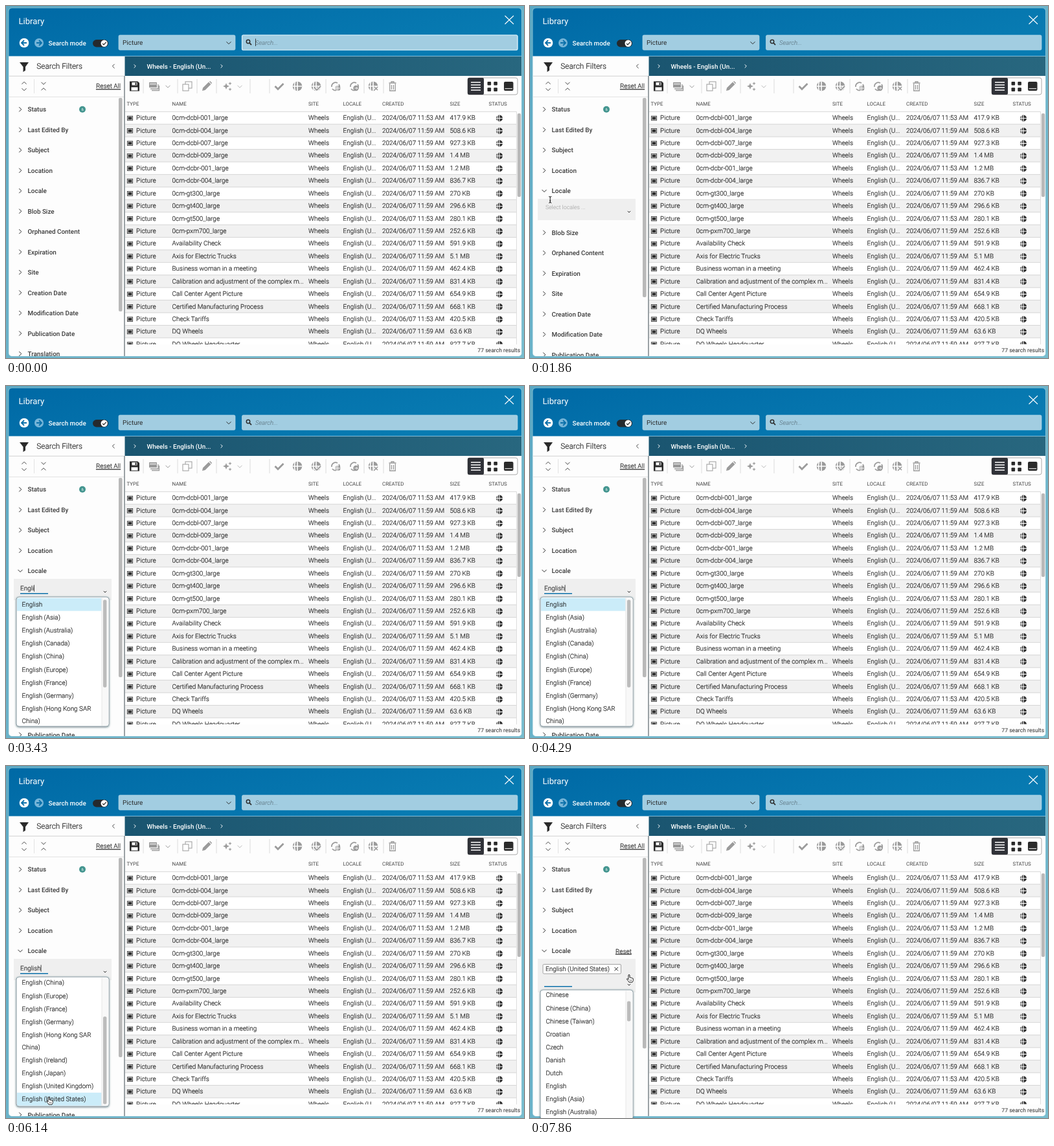
Animation of 800x544 px, one loop 8000 ms. Source, as an HTML page:

```html
<!DOCTYPE html>
<html lang="en">
<head>
<meta charset="utf-8">
<title>Library</title>
<style>
  html, body { margin: 0; width: 100%; height: 100%; overflow: hidden; }
  svg { display: block; width: 800px; height: 544px; font: 300 9.97px Roboto, sans-serif; text-rendering: geometricPrecision; }
  text { white-space: pre; }
  .body { fill: #1c1c1c; stroke: #1c1c1c; stroke-width: .16px; }
  .bold { font-size: 9.88px; font-weight: 500; }
</style>
</head>
<body>
<svg id="stage" viewBox="0 0 800 544"></svg>
<script>
const INK = '#2b2b2b', GREY = '#9b9b9b', HOVER = '#cbecf9', BLUE = '#0a70aa', FIELD = '#a2cde1';
const LOOP = 8000;

// SVG helpers
const rect = (x, y, w, h, fill, extra = '') =>
  `<rect x="${x}" y="${y}" width="${w}" height="${h}" fill="${fill}" ${extra}/>`;
const text = (x, y, s, extra = '') => `<text x="${x}" y="${y}" fill="${INK}" ${extra}>${s}</text>`;
const bodyText = (x, y, s, extra = '') => text(x, y, s, `class="body" ${extra}`);
const line = (d, color = INK, width = 1, extra = '') =>
  `<path d="${d}" fill="none" stroke="${color}" stroke-width="${width}" ${extra}/>`;
const fill = (d, color) => `<path d="${d}" fill="${color}"/>`;
const circle = (x, y, r, color, extra = '') => `<circle cx="${x}" cy="${y}" r="${r}" fill="${color}" ${extra}/>`;
const at = (x, y, s) => `<g transform="translate(${x} ${y})">${s}</g>`;
const chevron = (x, y, dir, color = INK, s = 3.5) => line({
  right: `M${x - s / 2} ${y - s}l${s} ${s}l${-s} ${s}`,
  left: `M${x + s / 2} ${y - s}l${-s} ${s}l${s} ${s}`,
  down: `M${x - s} ${y - s / 2}l${s} ${s}l${s} ${-s}`,
  up: `M${x - s} ${y + s / 2}l${s} ${-s}l${s} ${s}`
}[dir], color, 1);
const globe = (x, y, r, color) => at(x, y, circle(0, 0, r, color) +
  line(`M${-r} 0H${r}M0 ${-r}V${r}M${-r * .45} ${-r}Q${-r * .75} 0 ${-r * .45} ${r}`, '#fff', r / 4.5));

const rows = `0cm-dcbl-001_large;53;417.9 KB
0cm-dcbl-004_large;59;508.6 KB
0cm-dcbl-007_large;59;927.3 KB
0cm-dcbl-009_large;59;1.4 MB
0cm-dcbr-001_large;53;1.2 MB
0cm-dcbr-004_large;59;836.7 KB
0cm-gt300_large;59;270 KB
0cm-gt400_large;59;296.6 KB
0cm-gt500_large;53;280.1 KB
0cm-pxm700_large;59;252.6 KB
Availability Check;59;591.9 KB
Axis for Electric Trucks;59;5.1 MB
Business woman in a meeting;59;462.4 KB
Calibration and adjustment of the complex m...;59;831.4 KB
Call Center Agent Picture;59;654.9 KB
Certified Manufacturing Process;59;668.1 KB
Check Tariffs;53;420.5 KB
DQ Wheels;59;63.6 KB
DQ Wheels Headquarter;59;827.7 KB`.split('\n').map(r => r.split(';'));

const filters = ['Status', 'Last Edited By', 'Subject', 'Location', 'Locale', 'Blob Size', 'Orphaned Content',
  'Expiration', 'Site', 'Creation Date', 'Modification Date', 'Publication Date', 'Translation'];

// "|" marks a wrapped second line
const english = ['English', ...['Asia', 'Australia', 'Canada', 'China', 'Europe', 'France', 'Germany',
  'Hong Kong SAR|China', 'Ireland', 'Japan', 'United Kingdom', 'United States'].map(c => `English (${c})`)];
const locales = ['Arabic', 'Arabic (United Arab|Emirates)', 'Bulgarian', 'Chinese', 'Chinese (China)',
  'Chinese (Taiwan)', 'Croatian', 'Czech', 'Danish', 'Dutch', ...english];

function header() {
  const backArrow = 'M4 0H-4M0 -4l-4 4l4 4';
  const box = 'rx="2" stroke="#b4d8e8" stroke-width=".7"';
  return rect(4, 3, 792.5, 74.5, 'url(#head)') +
    text(19.5, 28, 'Library', 'style="font-size:13.1px;font-weight:400;fill:#fff"') +
    line('M770.5 15l13.5 13M784 15l-13.5 13', '#fff', 1.1) +
    at(28, 57, circle(0, 0, 7.3, '#fff') + line(backArrow, BLUE, 1.9)) +
    at(51, 57, circle(0, 0, 7, '#76b5d8') + `<g transform="scale(-1 1)">${line(backArrow, BLUE, 1.8)}</g>`) +
    text(65.5, 61, 'Search mode', 'class="bold" style="fill:#fff"') +
    rect(134, 52, 24, 11.5, '#25292d', 'rx="5.7"') + circle(151.7, 57.7, 5.2, '#fff') +
    line('M149 57.8l2 2l3.6-4', '#222', 1.2) +
    rect(174, 45, 180, 23, FIELD, box) +
    text(180, 60, 'Picture', 'style="font-weight:400"') + chevron(344, 57, 'down') +
    rect(364.5, 45, 425.5, 23, FIELD, box) +
    circle(374, 55, 2.7, 'none', `stroke="${INK}" stroke-width="1.5"`) + line('M376 57l3 3.2', INK, 1.8) +
    text(385, 60, 'Search...', 'style="font-size:9.5px;font-style:italic;fill:#52656f"');
}

function toolbar() {
  const recycle = line('M-6 1A6 6 0 0 1 3 -5M5 -3A6 6 0 0 1 5 4M3 5.5A6 6 0 0 1 -5 4', GREY, 1.7);
  let s = rect(183.5, 78, 613, 30, 'url(#crumb)') +
    chevron(199, 93, 'right', '#fff', 2.6) + chevron(333, 93, 'right', '#fff', 2.6) +
    text(217.5, 96.5, 'Wheels - English (Un...', 'class="bold" style="fill:#fff"');
  for (const x of [212, 265, 295, 325, 377, 407, 494, 553, 583]) s += line(`M${x} 113V135`, '#dcdcdc');
  s += at(198.5, 124, fill('M-7.5-7.5H5l2.5 2.5V7.5H-7.5z', INK) + rect(-4, -6, 8, 4.5, '#fff') +
      rect(-5, 1.5, 10, 5, '#fff') + rect(1, -5.5, 2, 3.5, INK)) +
    at(228, 124, rect(-7, -6, 12, 8, GREY) + line('M-5 4H7V-3M-3 6.5H8.5V-1', GREY, 1.3) + line('M-6-3.5H4', '#fff')) +
    chevron(250, 124.5, 'down', GREY) +
    at(280, 124, rect(-3, -7, 10, 10, '#fff', `stroke="${GREY}"`) + rect(-7, -3, 9, 10, '#fff', `stroke="${GREY}"`)) +
    at(310, 124, fill('M-7 7l1-4.5L3-6.5l3.5 3.5L-2.5 6zM4-7.3l1.2-.8l3 3l-1 1.4z', GREY)) +
    at(341, 124, fill('M-1-5l1.4 3.6L4 0L.4 1.4L-1 5L-2.4 1.4L-6 0l3.6-1.4zM5-7l.8 2l2 .8l-2 .8l-.8 2l-.8-2l-2-.8l2-.8zM5 2l.8 2l2 .8l-2 .8l-.8 2l-.8-2l-2-.8l2-.8z', GREY)) +
    chevron(361, 124.5, 'down', '#bbb') +
    line('M415.5 124l4.5 4.5l8.5-8.5', GREY, 2.8) +
    globe(450, 124, 7.3, GREY) +
    globe(479, 124, 7.3, GREY) + line('M477 127l3 3l6-6', '#fff', 4) + line('M477 127l3 3l6-6', GREY, 1.8) +
    at(509, 124, recycle + globe(3.5, 3, 4, GREY)) +
    at(538, 124, recycle + circle(2.5, 3, 4.2, GREY) + line('M.5 3h4M3 1.2l2 1.8l-2 1.8', '#fff', .9)) +
    globe(567, 124, 7.3, GREY) + line('M569 125l5 5m0-5l-5 5', '#fff', 4) + line('M569 125l5 5m0-5l-5 5', GREY, 1.7) +
    at(597, 124, line('M-5.5-5H5.5M-2-5V-7H2V-5M-4.3-4V7H4.3V-4M-1.5-2V5M1.5-2V5', GREY, 1.3)) +
    rect(713, 111, 77, 26, '#fff', 'rx="3" stroke="#a9a9a9"') + rect(713, 111, 25, 26, '#303238', 'rx="2"') +
    line('M718 118h15M718 122h15M718 126h15M718 130h15', '#fff', 1.5);
  for (const x of [743.5, 753.3]) for (const y of [117, 126.3]) s += rect(x, y, 5.6, 5.6, INK, 'rx="1"');
  return s + rect(769, 117, 14.5, 14, INK, 'rx="2"') + line('M770.5 127.7h11.5', '#fff', 1);
}

function table() {
  const columns = { TYPE: 186.5, NAME: 256.5, SITE: 467, LOCALE: 520.5, CREATED: 581, SIZE: 685.5, STATUS: 745.5 };
  let s = '';
  for (const name in columns) s += text(columns[name], 154.2, name, 'style="font-size:7.9px;font-weight:400;fill:#444"');
  let body = '';
  rows.forEach(([name, minute, size], i) => {
    const y = 163.3 + 19.42 * i, base = y + 12.9, mid = y + 9.8;
    const cells = { 201: 'Picture', 256.5: name, 467: 'Wheels', 520.5: 'English (U...',
      581: `2024/06/07 11:${minute} AM`, 685.5: size };
    body += rect(184, y, 604, 19.42, i % 2 ? '#f1f1f1' : '#fff') + line(`M184 ${y}H788`, '#cdcdcd', .8) +
      rect(187.3, mid - 3, 8.4, 6.6, INK, `stroke="${INK}" stroke-width=".7"`) +
      rect(188.2, mid - 2.1, 6.6, 4.8, INK, 'stroke="#fff" stroke-width=".7"') +
      globe(762, mid + .4, 5, INK);
    for (const x in cells) body += bodyText(x, base, cells[x]);
  });
  return s + `<g clip-path="url(#rows)">${body}</g>` +
    line('M788.5 163V523', '#ddd') + rect(789.8, 166, 5.4, 129, '#b9b9b9', 'rx="2"') +
    text(728.3, 535, '77 search results', 'style="font-size:8.65px;font-weight:400"');
}

function sidebarTop() {
  const thin = '#444';
  return fill('M21 87H35L30 94V99.5L26.5 102V94z', INK) +
    bodyText(47.3, 97.2, 'Search Filters', 'style="font-size:11.85px"') + chevron(166, 93, 'left', thin, 3.2) +
    line('M5 108.3H182', '#d2d2d2') + line('M43.5 113V135', '#e3e3e3') +
    chevron(28, 119, 'up', thin) + chevron(28, 129, 'down', thin) +
    chevron(58, 119.5, 'down', thin) + chevron(58, 128.5, 'up', thin) +
    bodyText(139, 127.3, 'Reset All', 'text-decoration="underline"') + line('M5 140.5H182', '#e3e3e3');
}

const clamp01 = v => Math.max(0, Math.min(1, v));
const ease = (t, from, to) => { const p = clamp01((t - from) / (to - from)); return p * p * (3 - 2 * p); };

// Pointer stops: departure time, arrival time, x, y
const stops = [[500, 1000, 23.5, 286], [1720, 1950, 35, 306], [4350, 4700, 76, 403], [5290, 5900, 66, 512], [6900, 7650, 153, 323]];
function pointerAt(t) {
  let x = -12, y = 302;
  for (const [from, to, px, py] of stops) {
    const p = ease(t, from, to);
    x += (px - x) * p;
    y += (py - y) * p;
  }
  return { x, y, shown: t < 2650 || t > 4350, beam: t > 1850 && t < 4450 };
}

function drawPointer({ x, y, shown, beam }) {
  if (!shown) return '';
  return at(x, y, beam
    ? line('M-2-5Q0-5 0-3.5Q0-5 2-5M0-4V4M-2 5Q0 5 0 3.5Q0 5 2 5M-1 1.5H1', '#111', 1)
    : `<path d="M-1 0Q0-1.2 1 0V4Q2.2 3.3 3 4.5Q4.3 4 4.8 5Q6.3 4.6 6.3 6V8.5Q6 10 5 11.2H0Q-1.2 8.8-3.4 6.8Q-3.8 5.4-2.2 5.8L-1 7z" fill="#fff" stroke="#111" stroke-width=".9"/>` +
      line('M1.5 7V9.5M3.5 7V9.5', '#111', .6));
}

function dropdown(t, pointer, typed, picked) {
  const top = picked ? 346 : 326, viewTop = top + 1.5;
  const items = typed && !picked ? english : locales;
  const scroll = 83 * ease(t, 4400, 4850);
  let y = viewTop - scroll, list = '';
  items.forEach((item, i) => {
    const lines = item.split('|'), h = lines.length > 1 ? 39.2 : 20.1;
    const hovered = t < 4420 ? i === 0
      : pointer.x < 148 && pointer.y > viewTop && pointer.y + 2 >= y && pointer.y + 2 < y + h;
    if (hovered) list += rect(17, y, 130.5, h, HOVER);
    lines.forEach((s, k) => list += bodyText(24.5, y + 13.5 + 19.1 * k, s));
    y += h;
  });
  const content = items === english ? 280.5 : 1223, thumb = 192 * 197.5 / content;
  return rect(16, top, 143, 200, '#fff', 'rx="4" stroke="#8fa0a8" filter="url(#shadow)"') +
    `<clipPath id="view">${rect(16.5, viewTop, 142, 197.5, '#fff', 'rx="3"')}</clipPath><g clip-path="url(#view)">` + list +
    rect(148, top, 11, 200, '#f8f8f8') + line(`M148 ${top}v200`, '#e6e6e6') +
    rect(150, top + 4.5 + scroll * 192 / content, 5.4, thumb, '#bcbcbc', 'rx="2"') + '</g>';
}

function localeField(typed, open, picked) {
  let s = rect(12, 298, 151, picked ? 52 : 33, '#efefef') + chevron(153, picked ? 338 : 318, 'down', INK, 2.2);
  if (picked) {
    s += bodyText(132, 289.5, 'Reset', 'text-decoration="underline"') +
      rect(20, 306.5, 120.5, 14.5, '#fff', 'rx="1.5" stroke="#8c8c8c" stroke-width=".8"') +
      bodyText(24, 317.2, 'English (United States)') + line('M130.5 311l5.5 5.5m0-5.5l-5.5 5.5', INK, 1) +
      line('M22 340.7H65', BLUE, 1.5);
  } else if (typed) {
    s += bodyText(22, 316.3, 'English'.slice(0, typed) + '<tspan dx="-1" font-size="12">|</tspan>') +
      line('M22 320.7H65', BLUE, 1.5);
  } else {
    s += text(24, 314.2, 'Select locales ...', 'style="font-size:8.8px;fill:#969696"');
    if (open) s += line('M20.3 306V318.5', INK, 1) + line('M24 320.7H58', BLUE, 1.5);
  }
  return s;
}

function scene(t) {
  const expanded = t > 1600, open = t > 2150, picked = t > 6600;
  const typed = Math.floor(7 * clamp01((t - 2650) / 1050));
  const pointer = pointerAt(t);
  const shift = picked ? 53 : expanded ? 33 : 0;
  let s = '';
  if (!expanded) {
    s += rect(364.5, 45, 425.5, 23, 'none', 'rx="2" stroke="#d9f0fa" stroke-width="1.2"') + line('M385.5 50.5V62', INK, .9);
    if (pointer.x > 12) s += rect(12, 274.5, 151, 22.5, HOVER);
  }
  s += '<g clip-path="url(#side)">';
  filters.forEach((name, i) => {
    const y = 159.8 + 31.47 * i + (i > 4 ? shift : 0);
    s += chevron(22, y, i === 4 && expanded ? 'down' : 'right') + text(33.5, y + 3.6, name, 'class="bold" style="fill:#3a3a3a"');
  });
  s += circle(118, 159.8, 5, '#43958f') + text(116.4, 162, '6', 'style="font-size:6px;font-weight:400;fill:#fff"') +
    rect(174, 142, 5.6, 330 - shift * .67, '#b9b9b9', 'rx="2"');
  if (expanded) s += localeField(typed, open, picked);
  s += '</g>';
  if (open) s += dropdown(t, pointer, typed, picked);
  return s + drawPointer(pointer);
}

const gradient = (id, a, b, y2) =>
  `<linearGradient id="${id}" x1="0" y1="0" x2="1" y2="${y2}"><stop stop-color="${a}"/><stop offset="1" stop-color="${b}"/></linearGradient>`;
const stage = document.getElementById('stage');
stage.innerHTML = `<defs>
    ${gradient('head', '#0069a5', '#087bb2', .4)}${gradient('crumb', '#1a5570', '#28677f', 0)}${gradient('edge', '#5ba8c3', '#78bdcf', 1)}
    <clipPath id="window">${rect(4, 3, 792.5, 538.5, '#fff', 'rx="5"')}</clipPath>
    <clipPath id="rows">${rect(183, 160, 606, 363, '#fff')}</clipPath>
    <clipPath id="side">${rect(5, 141, 177, 400, '#fff')}</clipPath>
    <filter id="shadow"><feDropShadow dx="0" dy="1" stdDeviation="1.5" flood-color="#274653" flood-opacity=".65"/></filter>
  </defs>` + rect(0, 0, 800, 544, 'url(#edge)') +
  `<g clip-path="url(#window)">` + rect(4, 3, 793, 539, '#fdfdfd') + header() + toolbar() + sidebarTop() + table() +
  line('M183 108V541', '#59656b', 1.2) + '</g>' +
  rect(4, 3, 792.5, 538.5, 'none', 'rx="5" stroke="#86c0d3" stroke-width=".8"') + '<g id="live"></g>';

const live = document.getElementById('live');
const start = performance.now();
function frame() {
  live.innerHTML = scene((performance.now() - start) % LOOP);
  requestAnimationFrame(frame);
}
frame();
</script>
</body>
</html>
```
